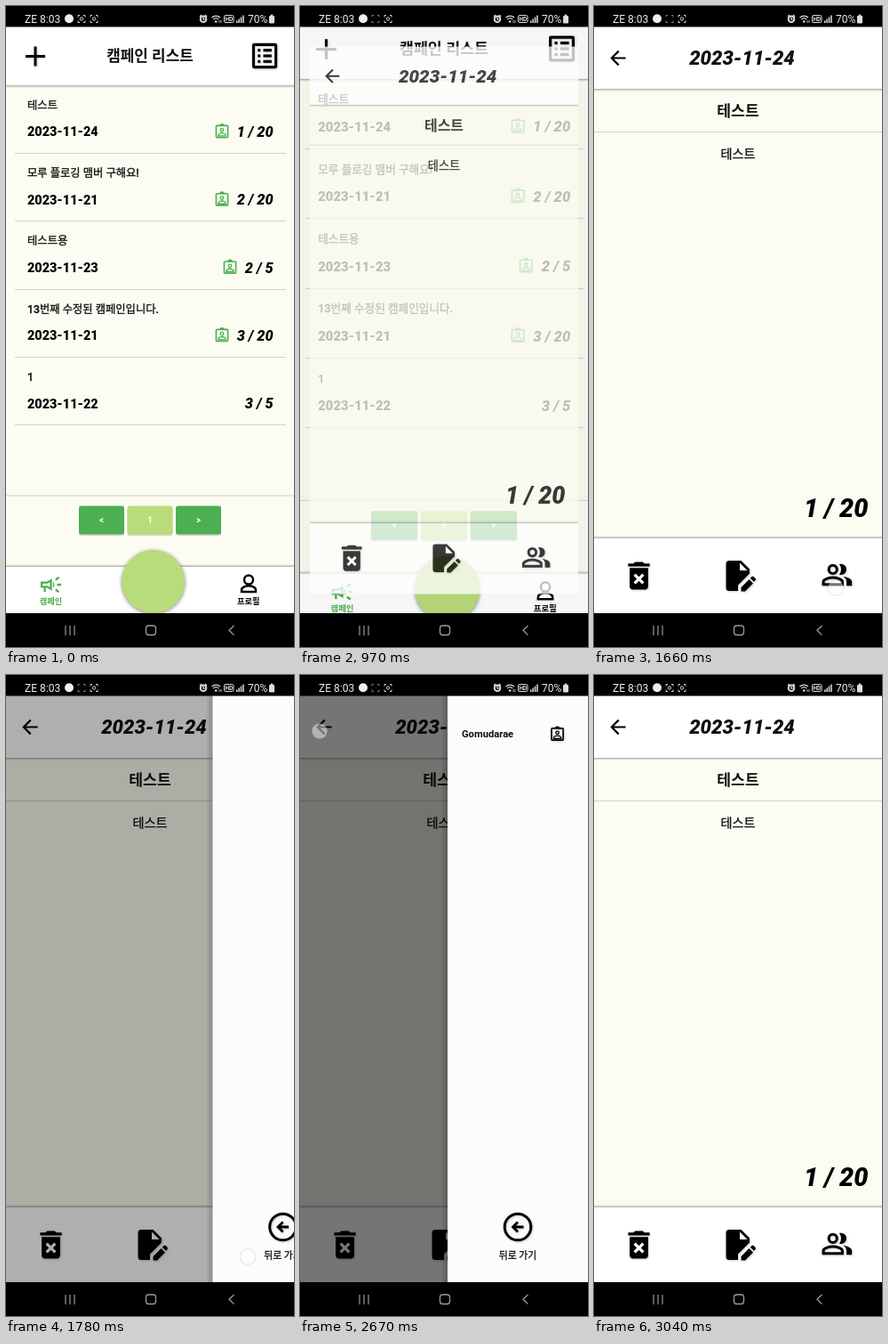
Animation, 324 px wide and 720 px high, one loop 3.17 s. Source, as an HTML page:

```html
<!DOCTYPE html>
<html lang="ko">
<head>
<meta charset="utf-8">
<title>캠페인 리스트</title>
<style>
  html, body { margin: 0; width: 100%; height: 100%; overflow: hidden; background: #000; }
  svg { display: block; width: 100vw; height: 100vh; }
  text { font-family: Roboto, "Noto Sans CJK KR", "Noto Sans CJK", sans-serif; }
  .lift { filter: drop-shadow(1.5px 1.5px 1px rgba(0, 0, 0, .2)); }
  .disc { filter: drop-shadow(0 1px 2px rgba(0, 0, 0, .5)); }
</style>
</head>
<body>
<svg id="stage" viewBox="0 0 324 720" xmlns="http://www.w3.org/2000/svg"></svg>
<script>
const LOOP = 3170, STEP = 62;
const CREAM = '#fcfcf2', GREEN = '#4caf50', LIME = '#b9dc7a', INK = '#111', RULE = '#d2d2cb';

const rect = (x, y, w, h, fill, more = '') =>
  `<rect x="${x}" y="${y}" width="${w}" height="${h}" fill="${fill}" ${more}/>`;
// Medium weight gets a hairline outline, since the Korean face has only regular and bold.
const text = (x, y, size, str, { weight = 500, anchor = 'start', fill = INK, italic = false } = {}) =>
  `<text x="${x}" y="${y}" font-size="${size}" font-weight="${weight}" text-anchor="${anchor}" fill="${fill}"` +
  `${weight === 500 ? ` stroke="${fill}" stroke-width=".3"` : ''}${italic ? ' font-style="italic"' : ''}>${str}</text>`;
const line = (d, color, width = 1, more = '') =>
  `<path d="${d}" fill="none" stroke="${color}" stroke-width="${width}" ${more}/>`;

// Icons live on a 24-unit grid and are centred on (x, y).
const icon = (x, y, scale, color, body, more = '') =>
  `<g ${more}><g transform="translate(${x} ${y}) scale(${scale}) translate(-12 -12)" fill="${color}" stroke="none">${body}</g></g>`;
const LIFT = 'class="lift"';

const shade = (y, dir = 1) =>
  [.27, .14, .05].map((a, i) => rect(0, y + dir * i, 324, 1, '#000', `opacity="${a}"`)).join('');

const badge = (x, y, scale, color) => icon(x, y, scale, color,
  rect(4, 4, 16, 16, 'none', `rx="1" stroke="${color}" stroke-width="2"`) +
  `<path d="M8.5 4.5a3.5 3.5 0 0 1 7 0z"/>` +
  `<circle cx="12" cy="9.9" r="2.1" fill="none" stroke="${color}" stroke-width="1.6"/>` +
  line('M7 18v-1c0-2 3-3 5-3s5 1 5 3v1z', color, 1.7));

function statusBar() {
  const corners = (x) => line(
    `M${x - 4} 12.5v-2h2M${x + 2} 10.5h2v2M${x + 4} 16.5v2h-2M${x - 2} 18.5h-2v-2`, '#ddd', 1);
  const lens = (x) => `<circle cx="${x}" cy="14.5" r="1.7" fill="none" stroke="#ddd"/>`;
  const bars = [0, 1, 2, 3].map(i => rect(259 + i * 2.4, 16.5 - i * 2, 1.5, 2.5 + i * 2, '#ddd')).join('');
  return rect(0, 0, 324, 23.5, '#000') +
    text(21, 18.6, 12, 'ZE 8:03', { weight: 400, fill: '#eee' }) +
    `<circle cx="71" cy="14.3" r="5" fill="#eee"/>` +
    `<g id="corners">${corners(85)}</g><g id="lens">${lens(85)}</g>${corners(99)}${lens(99)}` +
    `<circle cx="222" cy="14.8" r="3.3" fill="none" stroke="#ddd" stroke-width="1.9"/>` +
    line('M218 12l2-2M226 12l-2-2M222 13v2h1.5', '#ddd', 1.3) +
    line('M231.5 13a7 7 0 0 1 9.5 0M233.2 15a4.5 4.5 0 0 1 6 0', '#ddd', 1.2) +
    `<circle cx="236.2" cy="17.5" r="1.3" fill="#ddd"/>` + line('M240 16v3M242 16v3', '#ddd', .8) +
    rect(245.5, 10.5, 10.5, 8, 'none', 'rx="1.5" stroke="#ddd"') +
    text(250.8, 17, 6.5, 'HD', { weight: 700, anchor: 'middle', fill: '#ddd' }) + bars +
    text(272, 18.6, 12, '70%', { weight: 400, fill: '#eee' }) +
    rect(296, 11, 6, 8.5, '#ddd', 'rx="1"') + rect(297.7, 9.6, 2.6, 2, '#ddd');
}

function navBar() {
  const c = '#9a9a9a';
  return rect(0, 682, 324, 38, '#000') +
    line('M67 696v11M72 696v11M77 696v11', c, 1.2) +
    rect(157.5, 696, 11, 10.5, 'none', `rx="3" stroke="${c}" stroke-width="1.3"`) +
    line('M256.5 696l-5.5 5.3 5.5 5.3', c, 1.3);
}

function listPage() {
  const rows = [
    ['테스트', 24, '1 / 20'],
    ['모루 플로깅 맴버 구해요!', 21, '2 / 20'],
    ['테스트용', 23, '2 / 5'],
    ['13번째 수정된 캠페인입니다.', 21, '3 / 20'],
    ['1', 22, '3 / 5']
  ];
  const list = rows.map(([name, day, count], i) => {
    const y = i * 76.3;
    const mark = i < 4 ? badge(count.length > 5 ? 243 : 252, 141 + y, .82, GREEN) : '';
    return text(24, 115.8 + y, 12.3, name) +
      text(24, 146.4 + y, 14.4, '2023-11-' + day, { weight: 800, fill: '#000' }) +
      mark + text(300.5, 147 + y, 16.2, count, { weight: 900, anchor: 'end', italic: true, fill: '#000' }) +
      rect(10, 165 + Math.round(y), 305, 1, RULE);
  }).join('');

  const pager = ['&lt;', '1', '&gt;'].map((s, i) => {
    const x = 82 + i * 54.5;
    return rect(x, 563, 51, 32, '#000', 'rx="3" opacity=".16"') +
      rect(x, 561.5, 51, 32, i === 1 ? LIME : GREEN, 'rx="2.5"') +
      text(x + 25.5, 581, 10, s, { weight: 700, anchor: 'middle', fill: '#fff' });
  }).join('');

  const listIcon = icon(291, 56, 1.57, '#000',
    rect(4, 4, 16, 16, 'none', 'stroke="#000" stroke-width="2" rx=".5"') +
    [7, 11, 15].map(y => rect(7, y, 2, 2, '#000') + rect(11, y, 6, 2, '#000')).join(''), LIFT);
  const horn = icon(50.5, 650, 1.15, GREEN,
    line('M3 10h5.3L12 7.8v8.4L8.3 14H3zM6 14v5', GREEN, 2) +
    '<path d="M14 8.7a4.5 4.5 0 0 1 0 6.6z"/>' +
    line('M18 12h4M16.6 16.8l3.2 2.4M16.6 7.2l3.2-2.4', GREEN, 2));
  const person = `<circle cx="273" cy="644.5" r="5" fill="none" stroke="#000" stroke-width="2.4"/>` +
    line('M265 658v-2c0-3.3 5-4.8 8-4.8s8 1.5 8 4.8v2z', '#000', 2.4);

  return rect(0, 23, 324, 660, CREAM) + rect(0, 23, 324, 66, '#fff') + shade(89) +
    `<g ${LIFT}>${line('M33 45.5v22M22 56.5h22', '#000', 3)}</g>` +
    text(162, 62, 16.9, '캠페인 리스트', { weight: 700, anchor: 'middle' }) + listIcon + list +
    rect(0, 549.5, 324, 1, RULE) + pager +
    rect(0, 630, 324, 53, '#fff') + shade(629, -1) + horn +
    text(50.5, 671.5, 9.2, '캠페인', { weight: 700, anchor: 'middle', fill: GREEN }) + person +
    text(272.8, 671.5, 9.2, '프로필', { weight: 700, anchor: 'middle', fill: '#000' }) +
    `<circle cx="165.7" cy="646.5" r="35.5" fill="${LIME}" class="disc"/>`;
}

function detailPage() {
  const arrow = icon(27, 58.5, 1.08, '#000',
    line('M20 12H5.5M12.7 4.7L5.4 12l7.3 7.3', '#000', 2));
  const bin = icon(50.5, 640, 1.73, '#000',
    '<path d="M6 19c0 1.1.9 2 2 2h8c1.1 0 2-.9 2-2V7H6zM19 4h-3.5l-1-1h-5l-1 1H5v2h14z"/>' +
    line('M9.2 11.2l5.6 5.6M14.8 11.2l-5.6 5.6', '#fff', 1.9), LIFT);
  const doc = `<g ${LIFT}>` +
    '<path d="M152 623h13.5l9.5 9.5v5l-13 13v6.5h-10a3.5 3.5 0 0 1-3.5-3.5v-27a3.5 3.5 0 0 1 3.5-3.5z"/>' +
    '<path d="M164 625.5v8.5h8.5z" fill="#fff"/>' +
    '<path d="M165.5 657.5v-4.5l9-9 4.5 4.5-9 9zM175.7 642.8l1.8-1.8a1.5 1.5 0 0 1 2 0l2 2a1.5 1.5 0 0 1 0 2l-1.5 1.7z"/></g>';
  const people = icon(273.3, 639, 1.53, '#000',
    '<path d="M16.7 13.1C18 14 19 15.3 19 17v3h4v-3c0-2.2-3.6-3.5-6.3-3.9zM15 12a4 4 0 0 0 0-8c-.5 0-.9.1-1.3.2a6 6 0 0 1 0 7.6c.4.1.8.2 1.3.2z"/>' +
    '<circle cx="9" cy="8" r="3" fill="none" stroke="#000" stroke-width="2"/>' +
    line('M2 19v-2c0-1.7 4-3 7-3s7 1.3 7 3v2z', '#000', 2), LIFT);
  const mid = { weight: 700, anchor: 'middle' };

  return rect(0, 23, 324, 660, CREAM) + rect(0, 23, 324, 70, '#fff') + shade(93) + arrow +
    text(166.5, 66, 22.1, '2023-11-24', { ...mid, weight: 900, italic: true }) +
    text(162, 123.9, 17.2, '테스트', mid) + rect(0, 141, 324, 1, RULE) +
    text(162, 171.2, 14.2, '테스트', { ...mid, weight: 500 }) +
    text(308.5, 574, 28.8, '1 / 20', { weight: 900, anchor: 'end', italic: true, fill: '#000' }) +
    rect(0, 597, 324, 86, '#fff') + shade(597, -1) + bin + doc + people;
}

// Drawer contents, with the panel's left edge at x = 0.
function drawer() {
  return rect(-8, 23, 8, 660, 'url(#edge)') + rect(0, 23, 160, 660, '#fcfcfc') +
    `<g id="member">${text(16, 70, 11.2, 'Gomudarae', { weight: 700 })}` +
    `<g ${LIFT}>${badge(123.5, 66.5, .82, '#000')}</g></g>` +
    `<g ${LIFT}><circle cx="79" cy="620" r="14.8" fill="none" stroke="#000" stroke-width="3"/>` +
    line('M85.5 620H74M79 614.5l-5.5 5.5 5.5 5.5', '#000', 2.8) + '</g>' +
    text(79, 656, 10.8, '뒤로 가기', { anchor: 'middle' });
}

const scrim = (id) => rect(0, 23, 324, 660, '#000', `id="${id}"`);
const stage = document.getElementById('stage');
stage.innerHTML =
  '<defs><clipPath id="app"><rect y="23" width="324" height="660"/></clipPath>' +
  '<linearGradient id="edge"><stop stop-opacity="0"/><stop offset="1" stop-opacity=".2"/></linearGradient></defs>' +
  rect(0, 0, 324, 720, '#000') +
  `<g clip-path="url(#app)"><g id="list">${listPage()}</g>${scrim('pageDim')}` +
  `<g id="detail">${detailPage()}</g>${scrim('drawerDim')}<g id="drawer">${drawer()}</g></g>` +
  '<circle id="tap" r="8.8" fill="#fff" fill-opacity=".45" stroke="#000" stroke-opacity=".1"/>' +
  statusBar() + navBar();

const part = {};
stage.querySelectorAll('g[id], rect[id], circle[id]').forEach(el => part[el.id] = el);
const set = (id, name, value) => part[id].setAttribute(name, value);
const show = (id, on) => set(id, 'visibility', on ? 'visible' : 'hidden');

const clamp = v => Math.max(0, Math.min(1, v));
const hold = (t, origin) => origin + Math.floor((t - origin + 3) / STEP) * STEP;
const zoomEase = p => p < .166 ? .4 * (p / .166) ** 2 : 1 - .6 * (1 - (p - .166) / .834) ** 4;
const spring = ms => {
  const s = Math.max(0, ms) / 1000, w = Math.sqrt(500);
  return s > .36 ? 1 : 1 - (1 + (w - 1) * s) * Math.exp(-w * s);
};
const scaleAt = s => `translate(162 353) scale(${s}) translate(-162 -353)`;

function openAmount(t) {
  if (t < 2420) return spring(hold(t, 1780) - 1695);
  return t >= 2907 ? 0 : 1 - spring(hold(t, 2790) - 2705);
}

function draw(t) {
  const p = clamp((hold(t, 1090) - 900) / 300), zoom = zoomEase(p);
  set('list', 'transform', scaleAt(1 + .05 * zoom));
  set('detail', 'transform', scaleAt(.85 + .15 * zoom));
  set('detail', 'opacity', clamp((p - .125) / .125));
  set('pageDim', 'opacity', .6 * clamp((p - .2075) / .21));
  show('list', p < 1);

  const open = openAmount(t);
  set('drawer', 'transform', `translate(${324 - 158 * open} 0)`);
  set('drawerDim', 'opacity', .54 * open);
  show('drawer', open > 0);
  show('member', open > 0 && t >= 1837);

  const first = t >= 1660 && t < 1837, second = t >= 2420 && t < 2847;
  show('tap', first || second);
  set('tap', 'cx', first ? 272 : 22);
  set('tap', 'cy', first ? 653.5 : 63);

  const lensOn = t < 660 || t >= 3037;
  show('lens', lensOn);
  set('corners', 'opacity', lensOn ? 1 : .55);
}

let start;
function tick(now) {
  start ??= now;
  draw((now - start) % LOOP);
  requestAnimationFrame(tick);
}
draw(0);
requestAnimationFrame(tick);
</script>
</body>
</html>
```
